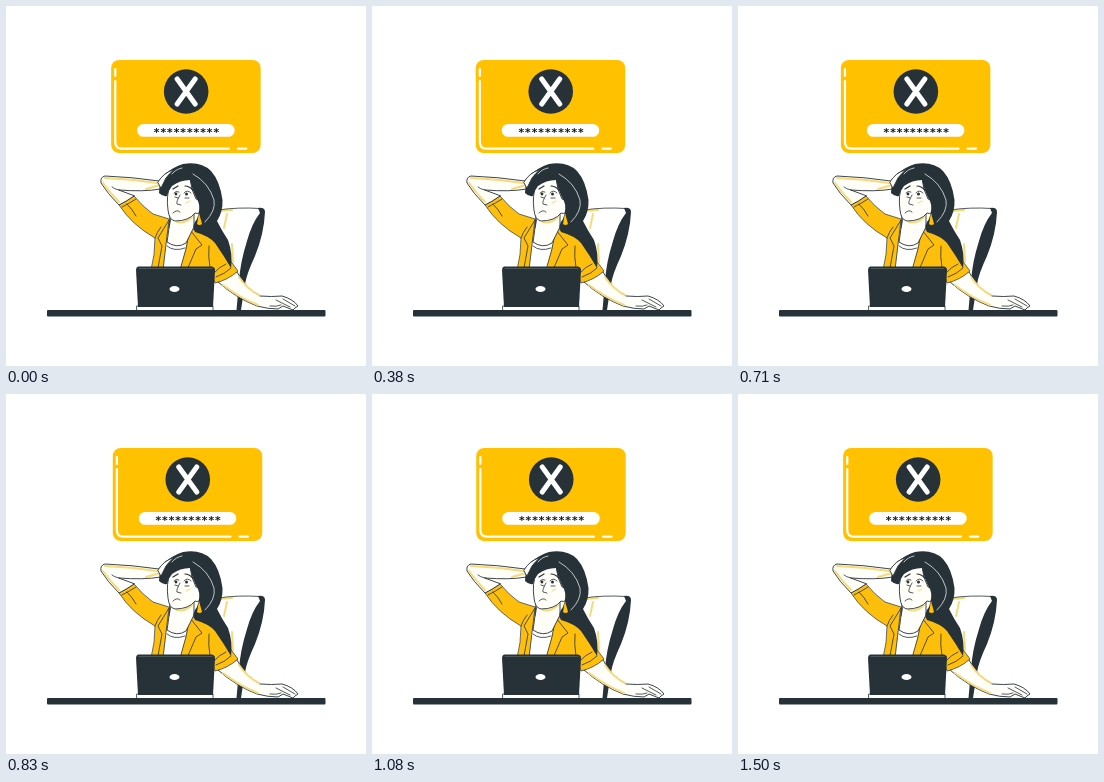
An HTML page for the animation above (1540 ms loop, 360x360 px).

```html
<!DOCTYPE html>
<html lang="en">
<head>
<meta charset="utf-8">
<title>Wrong password</title>
<style>
  html, body { margin: 0; width: 100%; height: 100%; overflow: hidden; background: #fff; }
  svg { display: block; width: 100vw; height: 100vh; }
  .ink { fill: #263238; }
  .sun { fill: #ffc100; }
  .coat { fill: #fdbe0c; stroke: #263238; stroke-width: .7; }
  .skin { fill: #fffef8; stroke: #263238; stroke-width: .9; }
  .line { fill: none; stroke: #263238; stroke-width: .8; }
  .glow { fill: none; stroke: #f6da7c; stroke-width: 2; }
  .shine { fill: none; stroke: #e6e9ea; stroke-width: .8; }
  .white { fill: none; stroke: #fff; stroke-width: 2.2; }
  path { stroke-linecap: round; stroke-linejoin: round; }
  text { font: bold 11px "DejaVu Sans Mono", monospace; fill: #15191b; }
</style>
</head>
<body>
<svg viewBox="0 0 360 360">
  <g id="chair">
    <path class="glow" d="M212 205L226 204M221 208L218 222M226 238L227 256"/>
    <path class="line" d="M212 204Q232 201 254 202.5"/>
    <path class="ink" d="M252 202Q259 201 259 206Q258 228 249 250Q241 267 239 278L235 304H230.5L233 276Q234 257 241 235Q246 217 254 207Z"/>
  </g>

  <g id="rightArm">
    <path class="skin" d="M212 276Q230 292 251 300Q262 303 272 303L277 300L287 304L289 302L292 300Q287 293 276 290Q266 291 254 290Q240 283 231 266Z"/>
    <path class="line" d="M270 294L284 301M277 293L289 300M264 300Q271 301 275 299"/>
    <path class="glow" d="M217 279Q234 292 252 299M233 271Q241 283 253 289"/>
  </g>

  <g id="jacket">
    <path class="coat" d="M128 190Q137 201 147 208L163 213L185 222L207 230Q216 244 232 265Q222 274 209 277L205 264H145Q149 249 149 232Q126 219 113 199Q121 195 128 190Z"/>
    <path fill="#fff" d="M163 214Q160 238 157 264H174Q180 244 184 222Z"/>
    <path class="line" d="M163 214Q160 238 157 264M184 222Q181 243 174 264M161 240Q168 246 179 242M149 232Q151 226 155 221M163 214L152 232L156 240L152 262M184 224L196 239L190 243L181 264M204 262Q202 250 203 240M220 258Q213 261 208 267M225 262Q219 268 210 271M121 198Q127 204 130 210M116 201Q124 197 130 193"/>
  </g>

  <g id="leftArm">
    <path class="skin" d="M128 190Q121 195 113 199Q101 187 95 177Q94 171 99 170Q126 171 153 175Q158 167 167 163L170 167L155 183Q137 186 113 184Z"/>
    <path class="glow" d="M99 172Q125 173 151 177M97 177Q104 187 113 196M140 183L154 179"/>
    <path class="line" d="M113 184Q108 183 106 181"/>
  </g>

  <g id="head">
    <path class="skin" stroke="none" d="M164 205Q164 218 161 236Q171 243 180 237L188 221V200Z"/>
    <path class="line" d="M165 212L163 222"/>
    <path class="glow" d="M171 216Q179 218 186 211"/>
    <path class="skin" d="M164 179Q160 190 162 204Q163 214 169 215Q183 215 189 207Q194 209 195 203Q196 194 190 193Q185 184 184 172Q174 171 164 179Z"/>
    <path class="ink" d="M153 187Q153 176 160 168Q167 161 177 158Q195 155 205 165Q214 175 216.5 194Q217 206 211 215Q216 225 222 234Q227 248 225 262Q218 250 209 237Q203 230 189 226Q185 220 191 213Q195 202 192 195Q187 187 184 174Q174 174 166 180Q162 185 161 190Q157 191 153 187Z"/>
    <path class="skin" d="M152 176Q157 167 168 163.5Q163 168 160 172L155 182Z"/>
    <path class="line" style="stroke-width:1.2" d="M167 183L172 180M179 180Q183 180 187 184"/>
    <path class="line" d="M174 189Q170 196 171 198L175 199M167 207Q171 203 174 206M168 187Q170 184 173 186M178 187Q181 183 185 187M169 191L172 192M179 192L183 192"/>
    <circle class="ink" cx="170" cy="188" r="1.4"/>
    <circle class="ink" cx="180.5" cy="188" r="1.5"/>
    <path d="M180 197L184 195" stroke="#f6da7c" stroke-width="1"/>
    <path d="M193 207L191 218Q193.500 220 196 218Z" class="sun"/>
    <path class="shine" d="M187 168Q203 177 208 194Q210 205 199 216M176 162Q170 163 166 168"/>
  </g>

  <g id="laptop">
    <path d="M131 300H207V305H131Z" fill="#fff" stroke="#263238" stroke-width=".8"/>
    <path class="ink" d="M132 260.500H206Q209 261 209 264L207 301H132L130 264Q130 261 132 260.500Z"/>
    <path d="M133 262.500H206" stroke="#737c80" stroke-width=".5"/>
    <ellipse cx="168.500" cy="283" rx="5" ry="3" fill="#fff"/>
  </g>
  <rect class="ink" x="41" y="304" width="278.500" height="6.600" rx="1"/>

  <g id="card">
    <rect class="sun" x="105.300" y="54" width="149.500" height="93" rx="8"/>
    <path class="white" d="M109.400 63V70M109.400 75V136Q109.400 142.600 116 142.600H223M232 142.600H240.500"/>
    <circle class="ink" cx="180.300" cy="85.500" r="22.300"/>
    <path class="white" style="stroke-width:5" d="M171.300 73L189.300 98M189.300 73L171.300 98"/>
    <rect x="131.300" y="118" width="97.500" height="12.800" rx="6.400" fill="#fff"/>
    <text x="147.500" y="130.300">**********</text>
  </g>
</svg>
<script>
  const LOOP = 1540, SHAKE = 1500, LEAD = 30, UNIT = 0.72;
  // offsets at every tenth of the shake
  const offsets = [0, -1, 2, -4, 4, -4, 4, -4, 2, -1, 0];
  const card = document.getElementById('card');

  const tick = k => Math.round(k * 25 / 6) * 10;

  function shake(ms) {
    const p = (ms % SHAKE) / SHAKE * 10;
    const i = Math.floor(p);
    return UNIT * (offsets[i] + (offsets[i + 1] - offsets[i]) * (p - i));
  }

  function draw(now) {
    const t = now % LOOP;
    let k = Math.floor(t * 0.024) + 1;
    while (tick(k) > t) k--;
    const x = shake(k * 125 / 3 + LEAD);
    card.setAttribute('transform', `translate(${x.toFixed(2)} 0)`);
  }

  const start = performance.now();
  function loop() {
    draw(performance.now() - start);
    requestAnimationFrame(loop);
  }
  loop();
</script>
</body>
</html>
```
